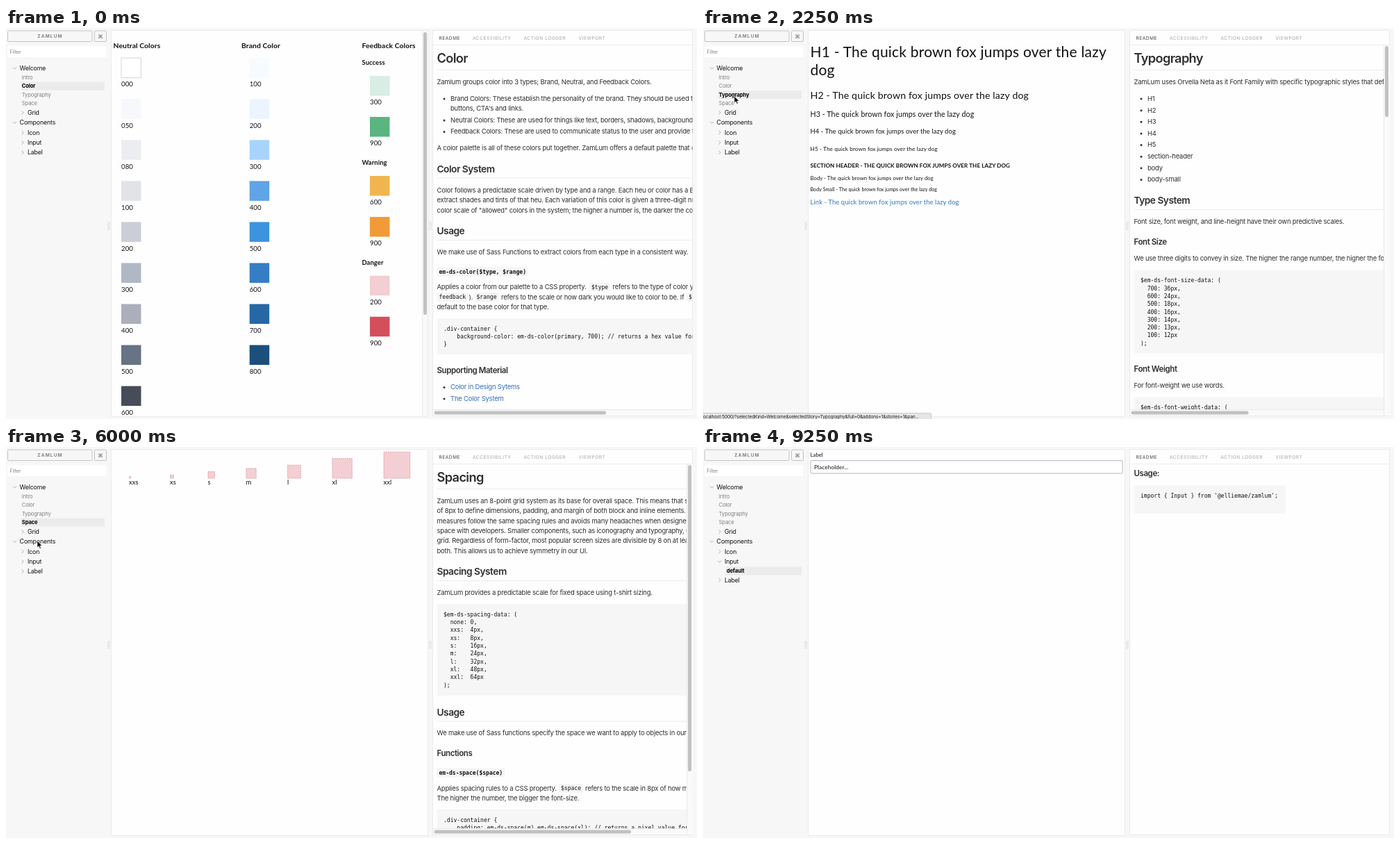
An HTML page for the animation above (10 s loop, 995 by 563 pixels).

```html
<!DOCTYPE html>
<html lang="en">
<head>
<meta charset="utf-8">
<title>Design system explorer</title>
<style>
  html, body { margin: 0; width: 100%; height: 100%; overflow: hidden; background: #f7f7f7; }
  svg { display: block; width: 995px; height: 563px; }
  text { font-family: Inter, sans-serif; letter-spacing: -.02em; white-space: pre; fill: #2e2e2e; }
  .head { font-weight: 600; letter-spacing: -.035em; }
  .brand { font-family: Lato, sans-serif; letter-spacing: .01em; fill: #111; }
  .mono { font-family: "DejaVu Sans Mono", monospace; letter-spacing: 0; fill: #111; }
  .tab { letter-spacing: .59px; fill: #a5a5a5; }
  .bold { font-weight: 700; }
</style>
</head>
<body>
<svg viewBox="0 0 995 563">
  <defs>
    <clipPath id="previewClip"><rect x="152" y="4" width="455" height="555"/></clipPath>
    <clipPath id="wide"><rect x="615" y="25" width="373.5" height="524"/></clipPath>
    <clipPath id="narrow"><rect x="615" y="25" width="365" height="524"/></clipPath>
  </defs>
  <g id="frame"></g>
  <g id="tree"></g>
  <g id="preview" clip-path="url(#previewClip)"></g>
  <g id="readme"></g>
  <g id="status"></g>
  <path id="cursor" d="M0 0V9.8L2.2 7.8 3.8 11.4 5.4 10.7 3.9 7.2H7Z" stroke="#fff" stroke-width=".7"/>
</svg>
<script>
const $ = id => document.getElementById(id);

// Text is placed by its left edge and the middle of its capitals.
const text = (x, y, s, size = 9.45, cls = '', attrs = '') =>
  `<text x="${x}" y="${y + size * .36}" font-size="${size}" class="${cls}" ${attrs}>${s}</text>`;
const rect = (x, y, w, h, fill, attrs = '') =>
  `<rect x="${x}" y="${y}" width="${w}" height="${h}" fill="${fill}" ${attrs}/>`;
const line = (x1, y1, x2, y2, color = '#ebebeb') =>
  `<path d="M${x1} ${y1}L${x2} ${y2}" stroke="${color}"/>`;
const chevron = (x, y, open) =>
  `<path d="M-1.3-2.6L1.3 0-1.3 2.6" transform="translate(${x} ${y}) rotate(${open ? 90 : 0})" fill="none" stroke="#999" stroke-width=".8"/>`;

// Readme building blocks
const LEFT = 620.5;
const lines = (y, rows, step = 14.35) => rows.map((s, i) => text(LEFT, y + i * step, s)).join('');
const h1 = s => text(LEFT, 43, s, 18.2, 'head') + line(LEFT, 60.5, 989, 60.5);
const h2 = (y, s) => text(LEFT, y, s, 13.7, 'head') + line(LEFT, y + 13, 989, y + 13);
const h3 = (y, s) => text(LEFT, y, s, 11.47, 'head');
const bullet = (y, s, attrs) => `<circle cx="631" cy="${y + .5}" r="1.5" fill="#333"/>` + text(640, y, s, 9.45, '', attrs);
const code = (x, y, s, cls = '') =>
  rect(x, y - 6.5, s.length * 4.83 + 6, 13, '#f5f5f5', 'rx="2"') + text(x + 3, y, s, 8.02, 'mono ' + cls);
const pre = (y, h, rows, w = 380) => rect(LEFT, y, w, h, '#f6f6f6', 'rx="2"') +
  rows.map((s, i) => text(630, y + 15 + i * 11.3, s, 8.02, 'mono')).join('');
const thumb = (x, y, w, h) => rect(x, y, w, h, '#c1c1c1', 'rx="2.5"');
const scrollX = w => rect(615, 549, 374, 9, '#fafafa') + line(615, 549.5, 989, 549.5, '#e8e8e8') + thumb(616.5, 551.5, w, 5);
const scrollY = h => rect(980, 25, 9, 533, '#fafafa') + line(980.5, 25, 980.5, 558, '#e8e8e8') + thumb(982, 26, 5, h);
const doc = (clip, body, bars) => `<g clip-path="url(#${clip})">${body}</g>${bars}`;

// Preview building blocks
const swatch = (x, y, color, label) =>
  rect(x, y, 28.5, 28.5, color, color == '#fff' ? 'stroke="#d5d5d5"' : '') + text(x, y + 37.8, label, 9.6, 'brand');
const column = (x, y, colors, labels) =>
  colors.split(' ').map((c, i) => swatch(x, y + i * 59.05, '#' + c, labels.split(' ')[i])).join('');
const group = (y, title, colors, labels) =>
  text(512.5, y, title, 9.4, 'brand bold') + column(524, y + 19.2, colors, labels);

const fox = 'The quick brown fox jumps over the lazy';
const sample = (y, name, size, attrs) => text(154.5, y, `${name} - ${fox} dog`, size, 'brand', attrs);
const spaces = [['xxs', 177.5, 4], ['xs', 236.5, 8], ['s', 291, 16], ['m', 346, 24], ['l', 405.5, 32], ['xl', 470, 48], ['xxl', 544, 64]];

const pages = {
  Color: {
    preview:
      text(154.5, 25, 'Neutral Colors', 10.3, 'brand bold') +
      column(166, 43.2, 'fff f7f8fb ebedf0 e1e3e8 cbced6 b0b8c5 aaafbb 687384 464c58', '000 050 080 100 200 300 400 500 600') +
      text(339, 25, 'Brand Color', 10.3, 'brand bold') +
      column(350.7, 43.2, 'f6fbff ebf4ff a8d4fc 5fa4e6 3c93e0 357ec5 2668a5 1c4f7c', '100 200 300 400 500 600 700 800') +
      text(512.5, 25, 'Feedback Colors', 10.3, 'brand bold') +
      group(49.8, 'Success', 'd8ede4 5ab581', '300 900') +
      group(193.8, 'Warning', 'f0b54e f19a38', '600 900') +
      group(337.5, 'Danger', 'f1cfd3 d44f5c', '200 900') +
      rect(599, 4, 8, 555, '#fafafa') + line(599.5, 4, 599.5, 559, '#e8e8e8') + thumb(601, 6, 5, 407),
    readme: doc('wide',
      h1('Color') +
      lines(77.5, ['Zamlum groups color into 3 types; Brand, Neutral, and Feedback Colors.']) +
      bullet(101.5, 'Brand Colors: These establish the personality of the brand. They should be used to style') +
      text(640, 116, "buttons, CTA's and links.") +
      bullet(132.5, 'Neutral Colors: These are used for things like text, borders, shadows, backgrounds and') +
      bullet(149, 'Feedback Colors: These are used to communicate status to the user and provide feedback') +
      lines(173, ['A color palette is all of these colors put together. ZamLum offers a default palette that can be']) +
      h2(203, 'Color System') +
      lines(233.5, ['Color follows a predictable scale driven by type and a range. Each heu or color has a Base',
        'extract shades and tints of that heu. Each variation of this color is given a three-digit number',
        'color scale of "allowed" colors in the system; the higher a number is, the darker the color']) +
      h2(292.5, 'Usage') +
      lines(323, ['We make use of Sass Functions to extract colors from each type in a consistent way.']) +
      code(LEFT, 351, 'em-ds-color($type, $range)', 'bold') +
      lines(373, ['Applies a color from our palette to a CSS property.']) + code(840, 373, '$type') +
      text(873.5, 373, 'refers to the type of color you want') +
      code(LEFT, 387.5, 'feedback') + text(666.5, 387.5, ').') + code(674.5, 387.5, '$range') +
      text(713, 387.5, 'refers to the scale or how dark you would like to color to be. If') + code(980, 387.5, '$range') +
      lines(402, ['default to the base color for that type.']) +
      pre(418, 52, ['.div-container {', '    background-color: em-ds-color(primary, 700); // returns a hex value for', '}']) +
      h3(493, 'Supporting Material') +
      bullet(517, 'Color in Design Sytems', 'style="fill:#2f6cbf"') +
      bullet(533.5, 'The Color System', 'style="fill:#2f6cbf"'),
      scrollX(247.5)),
  },
  Typography: {
    preview:
      text(154.5, 34, `H1 - ${fox}`, 21, 'brand') + text(154.5, 60.5, 'dog', 21, 'brand') +
      sample(97, 'H2', 14.16) + sample(124.3, 'H3', 10.62) + sample(149, 'H4', 9.44) + sample(174, 'H5', 8.26) +
      text(154.5, 198, `SECTION HEADER - ${fox.toUpperCase()} DOG`, 8.1, 'brand bold') +
      sample(216, 'Body', 7.67) + sample(232.8, 'Body Small', 7.08) + sample(250.8, 'Link', 9.44, 'style="fill:#2f78c0"'),
    readme: doc('narrow',
      h1('Typography') +
      lines(77.5, ['ZamLum uses Orvella Neta as it Font Family with specific typographic styles that define']) +
      ['H1', 'H2', 'H3', 'H4', 'H5', 'section-header', 'body', 'body-small'].map((s, i) => bullet(101.5 + i * 16.64, s)).join('') +
      h2(248.5, 'Type System') +
      lines(279, ['Font size, font weight, and line-height have their own predictive scales.']) +
      h3(308, 'Font Size') +
      lines(331.5, ['We use three digits to convey in size. The higher the range number, the higher the font size']) +
      pre(348.5, 120, ['$em-ds-font-size-data: (', '  700: 36px,', '  600: 24px,', '  500: 18px,', '  400: 16px,',
        '  300: 14px,', '  200: 13px,', '  100: 12px', ');']) +
      h3(491, 'Font Weight') +
      lines(515, ['For font-weight we use words.']) +
      pre(531.5, 40, ['$em-ds-font-weight-data: (']),
      scrollX(169) + scrollY(102)),
  },
  Space: {
    preview: spaces.map(([name, x, px]) => {
      const size = px * .59;
      return rect(x, 45 - size, size, size, '#f3cfd3', 'stroke="#d98a93" stroke-width=".8" stroke-dasharray="1.8 1.2"') +
        text(x - .5, 51, name, 9.4, 'brand');
    }).join(''),
    readme: doc('narrow',
      h1('Spacing') +
      lines(77.5, ['ZamLum uses an 8-point grid system as its base for overall space. This means that sizes',
        'of 8px to define dimensions, padding, and margin of both block and inline elements. All',
        'measures follow the same spacing rules and avoids many headaches when designers',
        'space with developers. Smaller components, such as iconography and typography, use',
        'grid. Regardless of form-factor, most popular screen sizes are divisible by 8 on at least',
        'both. This allows us to achieve symmetry in our UI.']) +
      h2(179.5, 'Spacing System') +
      lines(210, ['ZamLum provides a predictable scale for fixed space using t-shirt sizing.']) +
      pre(226, 132, ['$em-ds-spacing-data: (', '  none: 0,', '  xxs:  4px,', '  xs:   8px,', '  s:    16px,', '  m:    24px,',
        '  l:    32px,', '  xl:   48px,', '  xxl:  64px', ');']) +
      h2(382, 'Usage') +
      lines(412, ['We make use of Sass functions specify the space we want to apply to objects in our system']) +
      h3(441, 'Functions') +
      code(LEFT, 469, 'em-ds-space($space)', 'bold') +
      lines(491.5, ['Applies spacing rules to a CSS property.']) + code(796, 491.5, '$space') +
      text(834, 491.5, 'refers to the scale in 8px of how much') +
      lines(506, ['The higher the number, the bigger the font-size.']) +
      pre(522, 50, ['.div-container {', '    padding: em-ds-space(m) em-ds-space(xl); // returns a pixel value for']),
      scrollX(283.5) + scrollY(441)),
  },
  default: {
    preview: text(154.5, 11.5, 'Label', 7.67, 'brand') +
      rect(155, 19.7, 449, 18.3, '#fff', 'rx="1" stroke="#aeb6bf"') + text(160, 29, 'Placeholder...', 8.3, 'brand'),
    readme: h3(38, 'Usage:') + pre(55, 41, ["import { Input } from '@elliemae/zamlum';"], 218.5),
  },
};

const handle = x => line(x, 279, x, 291, '#ddd') + line(x + 2, 279, x + 2, 291, '#ddd');
$('frame').innerHTML =
  rect(2.5, 4, 121.5, 15.5, '#f7f7f7', 'rx="1.5" stroke="#c4c4c4"') +
  text(63.5, 11.8, 'ZAMLUM', 6.5, 'bold', 'text-anchor="middle" style="letter-spacing:1.15px;fill:#828282"') +
  rect(127.5, 4, 17, 15.5, '#f7f7f7', 'rx="1.5" stroke="#c4c4c4"') +
  text(136, 11.8, '⌘', 7.5, '', 'text-anchor="middle" style="font-family:\'DejaVu Sans\',sans-serif;fill:#666"') +
  rect(2, 26, 142.5, 16, '#fff', 'rx="1.5"') + text(5.5, 34.3, 'Filter', 7.2, '', 'style="fill:#888"') +
  rect(151.5, 3.5, 456, 556, '#fefefe', 'stroke="#ebebeb"') +
  rect(614.5, 3.5, 374, 555, '#fefefe', 'stroke="#ebebeb"') + line(615, 24.5, 988, 24.5) +
  handle(147) + handle(610) +
  text(623.5, 14.3, 'README', 6.5, 'tab', 'style="fill:#444"') + text(672, 14.3, 'ACCESSIBILITY', 6.5, 'tab') +
  text(745.5, 14.3, 'ACTION LOGGER', 6.5, 'tab') + text(824.5, 14.3, 'VIEWPORT', 6.5, 'tab');

const story = (x, y, name, selected) => name == selected
  ? rect(x - 1, y - 6, 143 - x, 12, '#ebebeb') + text(x, y, name, 7.67, 'bold', 'style="fill:#000"')
  : text(x, y, name, 7.67, '', 'style="fill:#828282"');
const branch = (x, y, name, open) => chevron(x, y, open) + text(x + 7, y, name, 8.85, '', 'style="fill:#111"');

function drawTree(selected, open, shift) {
  return branch(12.6, 57.8, 'Welcome', true) +
    ['Intro', 'Color', 'Typography', 'Space'].map((s, i) => story(22.8, 71.2 + i * 12.45, s, selected)).join('') +
    branch(24, 122, 'Grid') + branch(12.6, 136.2, 'Components', true) +
    branch(24, 150.6, 'Icon') + branch(24, 165, 'Input', open) +
    (open ? story(34, 178.5, 'default', selected) : '') + branch(24, 179.2 + shift, 'Label');
}

function drawStatus(kind, name, length = 92, width = 329) {
  const url = `localhost:5000/?selectedKind=${kind}&selectedStory=${name}&full=0&addons=1&stories=1&panelRight=1&addonPanel=REACT_STORYBOOK%2Freadme%2Fpanel`;
  const shown = url.length > length ? url.slice(0, length) + '...' : url;
  return rect(-2, 554.7, width + 1.5, 12, '#e6e6e6', 'rx="1.5" stroke="#bdbdbd" stroke-width=".8"') +
    text(-1.5, 559.6, shown.replace(/&/g, '&amp;'), 6.6, '', 'style="fill:#222"');
}

// The picture advances in quarter-second steps; each key is [step, x, y].
const STEP = 250, LOOP = 10000;
const path = [[2, 985, 540], [4, 250, 190], [5, 80, 86], [6, 45, 98], [9, 45, 98], [11, 70, 108], [12, 71, 116], [16, 38, 110.5],
  [20, 38, 110.5], [21, 44, 96], [24, 45, 135], [29, 42, 166.5], [31, 45, 177], [32, 45, 177], [33, 480, 260], [34, 1010, 300]];

function cursorAt(step) {
  const i = path.findIndex(key => key[0] >= step);
  if (i < 0 || step < path[0][0]) return [1010, 570];
  const [b, bx, by] = path[i], [a, ax, ay] = path[Math.max(i - 1, 0)];
  const k = b > a ? (step - a) / (b - a) : 1;
  return [ax + (bx - ax) * k, ay + (by - ay) * k];
}

function statusAt(step) {
  if (step >= 7 && step < 10) return drawStatus('Welcome', 'Typography', 91);
  if (step >= 10 && step < 20) return drawStatus('Welcome', 'Space');
  if (step >= 20 && step < 22) return drawStatus('Welcome', 'Space', 200, 530);
  if (step >= 31 && step < 36) return drawStatus('Input', 'default');
  return '';
}

const pageAt = step => step < 9 ? 'Color' : step < 17 ? 'Typography' : step < 32 ? 'Space' : 'default';

let shown = -1;
function draw(now) {
  const step = Math.floor(now % LOOP / STEP);
  if (step != shown) {
    shown = step;
    const page = pageAt(step);
    $('tree').innerHTML = drawTree(page, step >= 30, step < 29 ? 0 : step < 30 ? .8 : 12.4);
    $('preview').innerHTML = pages[page].preview;
    $('readme').innerHTML = pages[step == 17 ? 'Typography' : page].readme;
    $('status').innerHTML = statusAt(step);
    $('status').setAttribute('opacity', step == 7 || step == 35 ? .5 : 1);
    $('cursor').setAttribute('transform', `translate(${cursorAt(step)})`);
  }
  requestAnimationFrame(draw);
}
const start = performance.now();
requestAnimationFrame(function first() { draw(performance.now() - start); });
</script>
</body>
</html>
```
